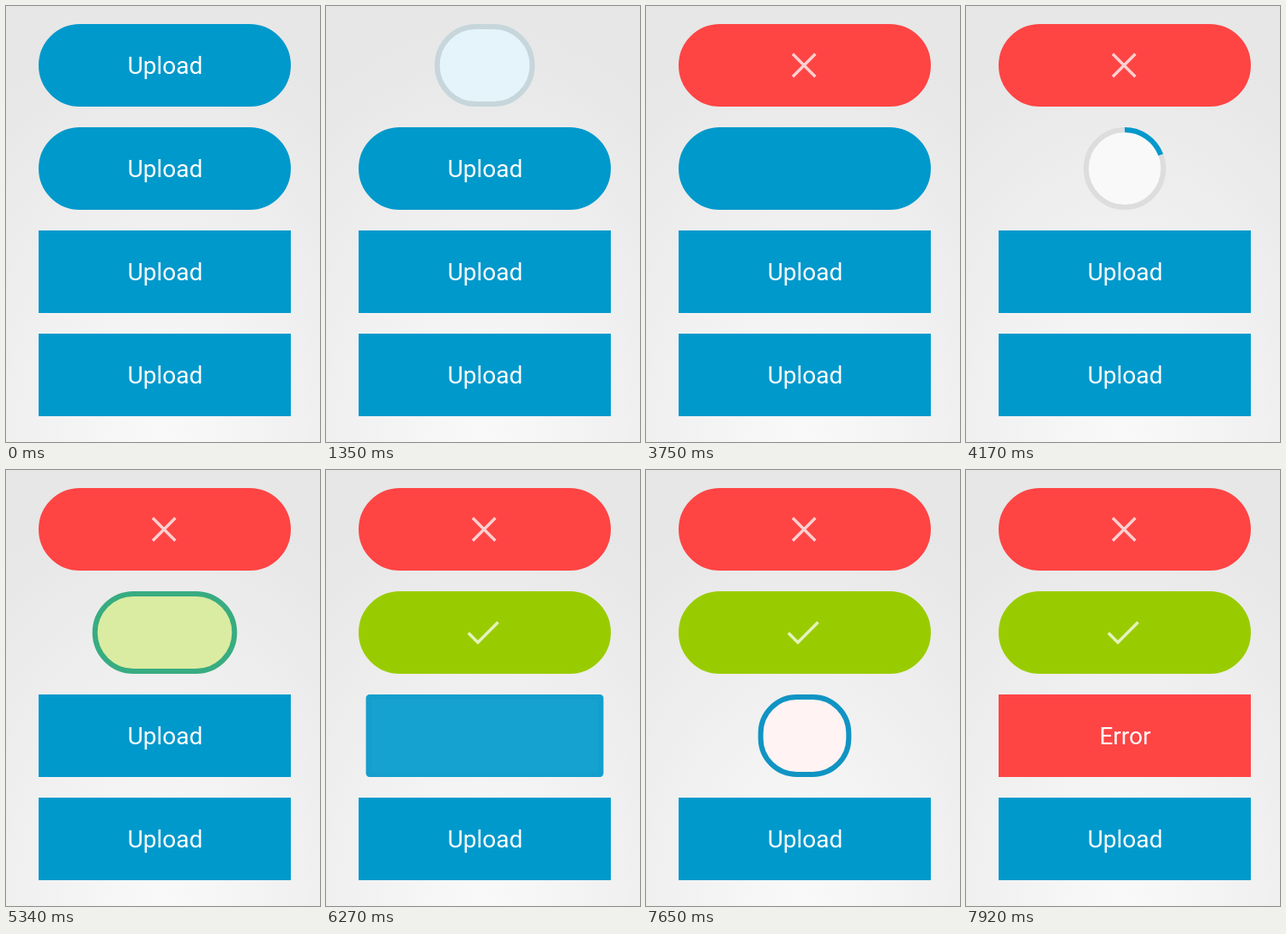
Animation, 366 px wide and 507 px high, one loop 8 s. Source, as an HTML page:

```html
<!DOCTYPE html>
<html lang="en">
<head>
<meta charset="utf-8">
<title>Upload buttons</title>
<style>
  html, body { margin: 0; width: 100%; height: 100%; overflow: hidden; }
  body { background: radial-gradient(ellipse 330px 480px at 50% 100%, #f9f9f9, #f6f6f6 20%, #e7e7e7); }
  svg { display: block; width: 100%; height: 100%; }
  text { font: 28px Roboto, Arial, sans-serif; fill: #fff; text-anchor: middle; }
  .icon { fill: none; stroke: #fff; stroke-opacity: .75; stroke-width: 3.4; }
</style>
</head>
<body>
<svg id="stage" viewBox="0 0 366 507"></svg>
<script>
const LOOP = 8000, STEP = 30;
const CX = 185, HEIGHT = 96, FULL = 294, STROKE = 6, ENTER = 400;
const BLUE = [0, 153, 204], RED = [255, 68, 68], GREEN = [153, 204, 0];
const WHITE = [255, 255, 255], PAPER = [249, 249, 249], GREY = [221, 221, 221];
const CROSS = 'M171 -13.2L197.4 13.2M197.4 -13.2L171 13.2';
const CHECK = 'M166 .5L177 11.5L200.5 -12';

// press: tap; load/exit: progress run; end: final state reached
const buttons = [
  { y: 21, radius: 48, press: 1020, load: 1074, exit: 2451, end: 2801, color: RED, icon: CROSS },
  { y: 141, radius: 48, press: 3750, load: 3767, exit: 5195, end: 5545, color: GREEN, icon: CHECK },
  { y: 261, radius: 0, press: 6180, load: 6225, exit: 7598, end: 7918, color: RED, label: 'Error' },
  { y: 381, radius: 0, press: Infinity }
];

const stage = document.getElementById('stage');
const clamp = v => Math.min(1, Math.max(0, v));
const ease = v => (1 - Math.cos(Math.PI * clamp(v))) / 2;
const mix = (a, b, p) => a + (b - a) * p;
const blend = (a, b, p) => a.map((v, i) => mix(v, b[i], p));
const rgb = c => `rgb(${c.map(Math.round)})`;

function set(node, attrs) {
  for (const key in attrs) node.setAttribute(key, attrs[key]);
}

function add(parent, tag, attrs) {
  const node = document.createElementNS('http://www.w3.org/2000/svg', tag);
  set(node, attrs);
  return parent.appendChild(node);
}

function build(b) {
  const g = add(stage, 'g', { transform: `translate(0 ${b.y + HEIGHT / 2})` });
  b.box = add(g, 'rect', {
    y: (STROKE - HEIGHT) / 2, height: HEIGHT - STROKE, 'stroke-width': STROKE
  });
  b.arc = add(g, 'circle', {
    cx: CX, r: (HEIGHT - STROKE) / 2, fill: 'none', stroke: rgb(BLUE),
    'stroke-width': STROKE, pathLength: 100, transform: `rotate(-90 ${CX} 0)`
  });
  b.text = add(g, 'text', { x: CX + .5, y: 10 });
  b.mark = add(g, 'path', { class: 'icon', d: b.icon || '' });
}

// round: 0 is the full button, 1 is the circle
function shape(b, round, fill, stroke) {
  const width = mix(FULL, HEIGHT, round);
  const radius = mix(b.radius, HEIGHT / 2, round);
  set(b.box, {
    x: CX - width / 2 + STROKE / 2, width: width - STROKE,
    rx: Math.max(0, radius - STROKE / 2), fill: rgb(fill), stroke: rgb(stroke)
  });
}

function draw(b, t) {
  const start = b.press + 14;
  let label = '', percent = 0;
  if (t < b.press) {
    label = 'Upload';
    shape(b, 0, BLUE, BLUE);
  } else if (t < start + ENTER) {
    const p = ease((t - start) / ENTER);
    shape(b, p, blend(BLUE, WHITE, p), blend(BLUE, GREY, p));
  } else if (t < b.exit) {
    percent = mix(1, 100, ease((t - b.load) / (b.exit - b.load)));
    shape(b, 1, PAPER, GREY);
  } else if (t < b.end) {
    const p = ease((t - b.exit) / (b.end - b.exit));
    shape(b, 1 - p, blend(WHITE, b.color, p), blend(BLUE, b.color, p));
  } else {
    label = b.label || '';
    shape(b, 0, b.color, b.color);
  }
  b.text.textContent = label;
  set(b.arc, {
    'stroke-dasharray': `${percent} 200`,
    visibility: percent ? 'visible' : 'hidden'
  });
  set(b.mark, { visibility: t >= b.end ? 'visible' : 'hidden' });
}

function render(now) {
  const t = Math.floor((now % LOOP) / STEP) * STEP;
  buttons.forEach(b => draw(b, t));
}

buttons.forEach(build);
render(0);
let origin;
function tick(now) {
  origin ??= now;
  render(now - origin);
  requestAnimationFrame(tick);
}
requestAnimationFrame(tick);
</script>
</body>
</html>
```
